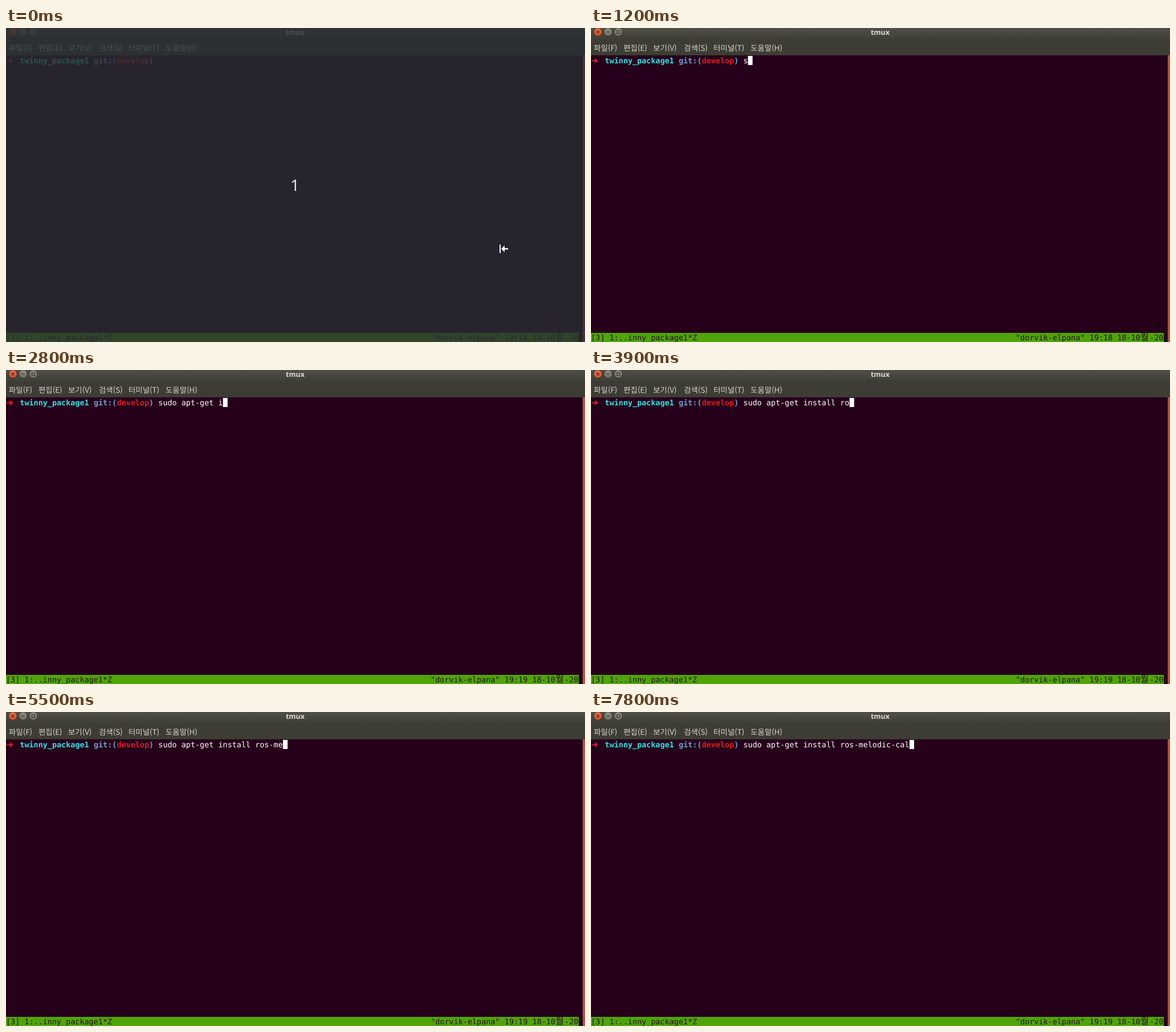
Recreate the animation shown at these times as an HTML page. Size 1016 by 551 pixels, loop 8 s.

```html
<!DOCTYPE html>
<html lang="ko">
<head>
<meta charset="utf-8">
<title>tmux</title>
<style>
  html, body { margin: 0; width: 100%; height: 100%; overflow: hidden; background: #26001b; }
  svg { display: block; width: 1016px; height: 551px; }
  text { white-space: pre; text-rendering: geometricPrecision; }
  .mono { font: 13.454px "DejaVu Sans Mono", monospace; }
  .bold { font-weight: bold; }
  .menu { font: 13.4px "Noto Sans CJK KR", "Noto Sans CJK", sans-serif; fill: #dad6cb; }
</style>
</head>
<body>
<svg id="stage" viewBox="0 0 1016 551" xmlns="http://www.w3.org/2000/svg">
  <defs>
    <linearGradient id="bar" x1="0" y1="0" x2="0" y2="1">
      <stop offset="0" stop-color="#504f48"/>
      <stop offset="1" stop-color="#3d3c35"/>
    </linearGradient>
    <linearGradient id="red" x1="0" y1="0" x2="0" y2="1">
      <stop offset="0" stop-color="#f0704c"/>
      <stop offset="1" stop-color="#dc4a23"/>
    </linearGradient>
    <linearGradient id="grey" x1="0" y1="0" x2="0" y2="1">
      <stop offset="0" stop-color="#928f83"/>
      <stop offset="1" stop-color="#706d62"/>
    </linearGradient>
  </defs>

  <rect width="1016" height="551" fill="#26001b"/>
  <rect width="1016" height="48" fill="#3d3c35"/>
  <rect width="1016" height="21" fill="url(#bar)"/>
  <g stroke="#34332d" stroke-width="1">
    <circle cx="12" cy="7" r="7.3" fill="url(#red)"/>
    <circle cx="30" cy="7" r="7.3" fill="url(#grey)"/>
    <circle cx="48" cy="7" r="7.3" fill="url(#grey)"/>
    <path d="M9.5 4.5l5 5m0-5l-5 5M27 7h6M45.5 4.5h5v5h-5z" fill="none" stroke-width="1.1"/>
  </g>
  <text x="507.5" y="11.5" text-anchor="middle" fill="#dfdbd2"
        style="font:bold 12.5px 'Open Sans','Noto Sans',sans-serif">tmux</text>
  <g id="menu"></g>
  <rect x="1012" y="48" width="4" height="503" fill="#b3553d"/>

  <path d="M1.5 56.5H7V53l5.5 4.5L7 62v-3.5H1.5z" fill="#e01822"/>
  <rect y="535" width="1005" height="16" fill="#50a40a"/>
  <g id="term"></g>
  <rect id="caret" width="8.1" height="16" fill="#fff"/>

  <path id="beam" d="M867 383.5h2l.5 .5l.5-.5h2M869.5 384v10.5M867 395h2l.5-.5l.5 .5h2"
        fill="none" stroke="#e8e4e6" stroke-width="1"/>
  <g id="intro">
    <rect width="1016" height="551" fill="rgb(40,45,51)" fill-opacity=".8"/>
    <text x="507" y="286" text-anchor="middle" fill="#e6dfe2"
          style="font:28px 'Noto Sans','Open Sans',sans-serif">1</text>
    <path d="M867 380v15M881 387.5h-9M875.5 382l-5.5 5.5l5.5 5.5" fill="none"
          stroke="#111" stroke-width="4" opacity=".5"/>
    <path d="M866 380h2v15h-2zM869 387.5l6-6v4.7h6v2.6h-6v4.7z" fill="#fff"/>
  </g>
</svg>
<script>
  const LOOP = 8000, CELL = 8.1, TOP = 49, ROW = 16.2, START = 33;
  const COMMAND = 'sudo apt-get install ros-melodic-cal';
  const QUESTION = 'zsh: do you wish to see all 1316 possibilities (1316 lines)? ';

  // [time, characters typed so far]
  const KEYS = [
    [0, 0], [1200, 1], [1300, 2], [1400, 4], [1500, 5], [1600, 6], [2000, 7],
    [2200, 8], [2300, 9], [2400, 10], [2500, 11], [2700, 13], [2800, 14],
    [3200, 15], [3300, 16], [3400, 17], [3500, 19], [3700, 20], [3800, 22], [3900, 23],
    [4100, 24], [4300, 26], [4700, 27], [6000, 28], [6200, 29], [6600, 31], [6900, 33],
    [7700, 35], [7800, 36]
  ];
  const CARET_OFF = [[0, 500], [1100, 1200], [7400, 7500]];

  const $ = id => document.getElementById(id);

  function addText(parent, x, y, text, cls, fill) {
    const el = document.createElementNS('http://www.w3.org/2000/svg', 'text');
    el.setAttribute('x', x);
    el.setAttribute('y', y);
    el.setAttribute('class', cls);
    if (fill) el.setAttribute('fill', fill);
    el.textContent = text;
    parent.appendChild(el);
    return el;
  }

  const cell = (col, row, text, fill, bold) =>
    addText($('term'), col * CELL, TOP + row * ROW + 13, text, bold ? 'mono bold' : 'mono', fill);

  const menu = [[5, '파일(F)'], [57, '편집(E)'], [109, '보기(V)'],
                [163, '검색(S)'], [215, '터미널(T)'], [280, '도움말(H)']];
  menu.forEach(([x, label]) => addText($('menu'), x, 40, label, 'menu'));

  cell(3, 0, 'twinny_package1', '#34e2e2', true);
  cell(19, 0, 'git:(', '#729fcf', true);
  cell(24, 0, 'develop', '#e01822', true);
  cell(31, 0, ')', '#729fcf', true);
  const typed = cell(START, 0, '', '#fff');
  const question = cell(0, 1, QUESTION, '#fff');

  const INK = '#26111b';
  cell(0, 30, '[3] 1:..inny_package1*Z', INK);
  cell(92, 30, '"dorvik-elpana"', INK);
  const clock = cell(108, 30, '', INK);
  cell(114, 30, '18-10', INK);
  cell(119, 30, '월', INK).style.font = '16px "Noto Sans CJK KR","Noto Sans CJK",sans-serif';
  cell(121, 30, '-20', INK);

  const within = (t, a, b) => t >= a && t < b;
  const show = (el, on) => el.setAttribute('visibility', on ? 'visible' : 'hidden');

  function render(t) {
    const count = KEYS.filter(k => k[0] <= t).pop()[1];
    const asking = within(t, 5000, 5500);

    typed.textContent = COMMAND.slice(0, count);
    clock.textContent = t < 2700 ? '19:18' : '19:19';

    show(question, asking);
    $('caret').setAttribute('x', (asking ? QUESTION.length : START + count) * CELL);
    $('caret').setAttribute('y', asking ? TOP + 16 : TOP);
    show($('caret'), !CARET_OFF.some(([a, b]) => within(t, a, b)));

    show($('intro'), t < 200);
    show($('beam'), within(t, 200, 1200));
  }

  const begin = performance.now();
  function tick() {
    render((performance.now() - begin) % LOOP);
    requestAnimationFrame(tick);
  }
  tick();
</script>
</body>
</html>
```
